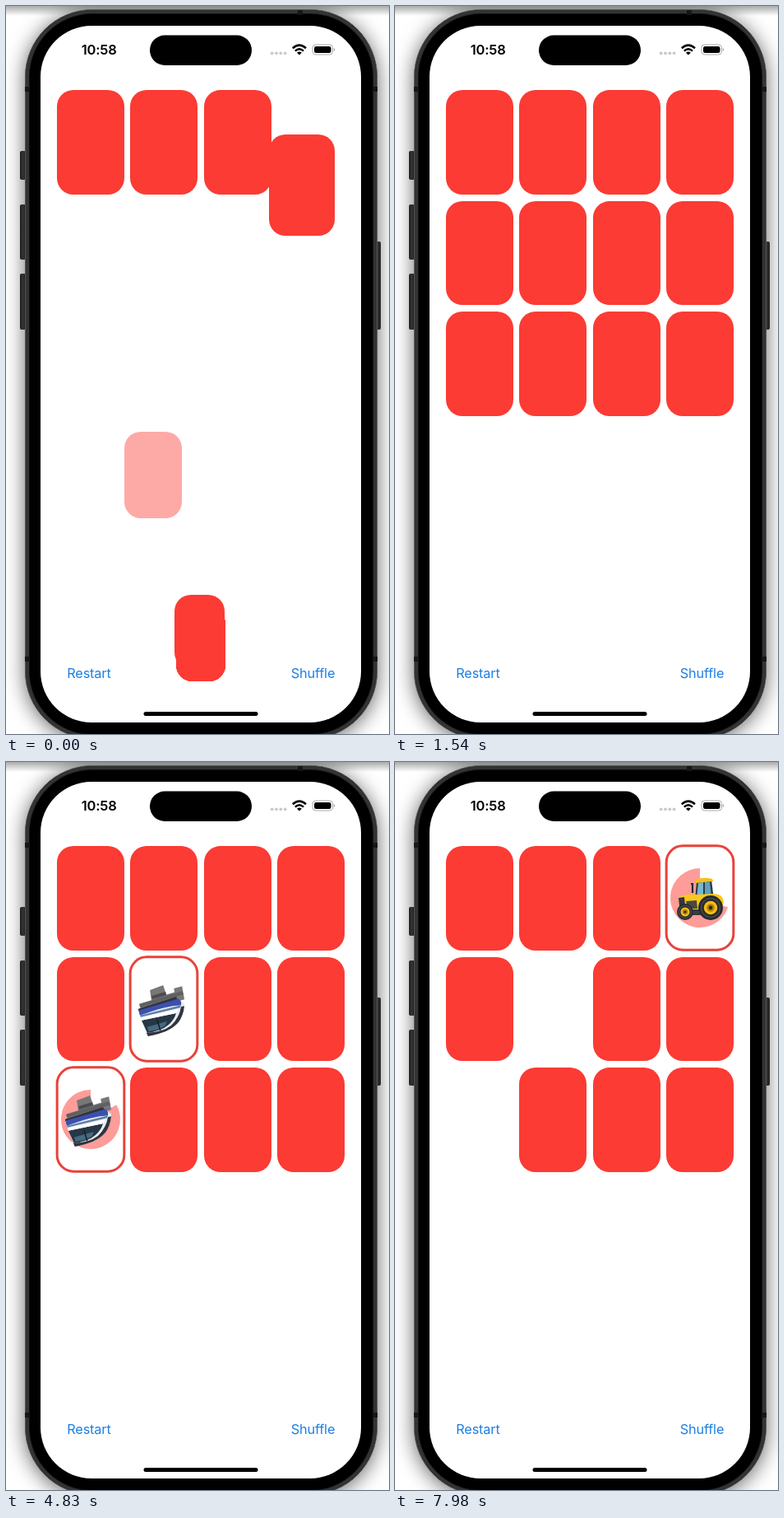
An HTML page for the animation above (8 s loop, 466 by 884 pixels).

```html
<!DOCTYPE html>
<html lang="en">
<head>
<meta charset="utf-8">
<title>Card game</title>
<style>
  html, body { margin: 0; width: 100%; height: 100%; overflow: hidden; background: #fff; }
  #stage { position: relative; width: 466px; height: 884px; overflow: hidden;
    background: linear-gradient(#0005, #0000 12px), #fff; }
  #stage > div, #stage > svg { position: absolute; }
  .body { left: 23px; top: 4px; width: 429px; height: 886px; border-radius: 82px; box-sizing: border-box;
    background: #000; border: 1px solid #555; box-shadow: 0 3px 24px #0009, inset 0 0 0 4px #333, inset 0 0 0 5px #111; }
  .screen { left: 42px; top: 24px; width: 390px; height: 846px; border-radius: 62px; background: #fff; }
  .key { background: linear-gradient(90deg, #222, #484848, #222); border-radius: 2px; }
  .notch { background: #161616; }
  #chrome { left: 0; top: 0; font-family: Inter, Roboto, sans-serif; }
  .card .back { position: absolute; inset: 0; border-radius: 20px; background: #fb3b34; }
  .card svg { position: absolute; left: 50%; top: 50%; width: 1px; height: 1px; overflow: visible; }
</style>
</head>
<body>
<div id="stage">
  <div class="key" style="left:17px;top:176px;width:7px;height:35px"></div>
  <div class="key" style="left:17px;top:241px;width:7px;height:67px"></div>
  <div class="key" style="left:17px;top:325px;width:7px;height:68px"></div>
  <div class="key" style="left:450px;top:286px;width:6px;height:107px"></div>
  <div class="body"></div>
  <div class="notch" style="left:23px;top:98px;width:6px;height:6px"></div>
  <div class="notch" style="left:446px;top:98px;width:6px;height:6px"></div>
  <div class="notch" style="left:23px;top:790px;width:6px;height:6px"></div>
  <div class="notch" style="left:446px;top:790px;width:6px;height:6px"></div>
  <div class="notch" style="left:355px;top:5px;width:6px;height:6px"></div>
  <div class="screen"></div>
  <svg id="chrome" width="466" height="884">
    <text x="113.2" y="59.2" font-size="16.5" font-weight="600" letter-spacing="-.2" text-anchor="middle">10:58</text>
    <rect x="175" y="35.5" width="124" height="36.5" rx="18.25"/>
    <g fill="#c9c9c9">
      <circle cx="323.7" cy="57.3" r="1.9"/><circle cx="329" cy="57.3" r="1.9"/>
      <circle cx="334.3" cy="57.3" r="1.9"/><circle cx="339.6" cy="57.3" r="1.9"/>
    </g>
    <g fill="none" stroke="#000" stroke-width="2.5">
      <path d="M348.8 51.3Q356.9 44 365 51.3M351.8 54.6Q356.9 50 362 54.6"/>
      <path d="M356.9 59.5L354 56.7Q356.9 54.4 359.8 56.7Z" fill="#000" stroke="none"/>
    </g>
    <rect x="373" y="47" width="24.5" height="12" rx="3.8" fill="none" stroke="#aaa"/>
    <rect x="375" y="49" width="20.5" height="8" rx="2.3"/>
    <path d="M398.8 51v4q1.5-.6 1.5-2t-1.5-2" fill="#aaa"/>
    <g font-size="16.3" letter-spacing="-.15" fill="#1e7fe2" text-anchor="middle">
      <text x="101" y="816.3">Restart</text><text x="373.5" y="816.3">Shuffle</text>
    </g>
    <rect x="167.5" y="857" width="139" height="5" rx="2.5"/>
  </svg>
</div>
<script>
const LOOP = 8000, STEP = 70;
const CARD = { w: 81.7, h: 126.3 };
const DECK = { x: 237, y: 775.3, w: 59.6, h: 89.4 };
const DEAL = { first: -941, gap: 175, length: 523 };
const SPRING = 10.88 / 1000;
const BONUS = 6300, SPIN = 2100;
const FIRST_TAP = 2910, MATCH = 3877, LAST_TAP = 6080;

// Drawn with the tilt the train has when it leans back by 17 degrees.
const train = `<g transform="rotate(17)">
  <path d="M-25 12L27-3L30 5L15 9.5L17 23L1 29L-3 17.5L-13 20.5L-12 25L-22 28Z" fill="#777"/>
  <path d="M-24 18L28 2L30 6L-22 22Z" fill="#606062"/>
  <path d="M-3 17L14 12L15 16L-2 21Z" fill="#4c4c4f"/>
  <path d="M19-33Q-7-29-18-16Q-25-5-25 7L-18 12L31-3Z" fill="#e9edf2"/>
  <path d="M19-33Q-7-29-18-16Q-24-7-25 4L-21 3Q-19-10-9-20Q1-28 21-29Z" fill="#30343d"/>
  <path d="M20-29Q3-27-6-19Q-13-13-15-5L27-14Z" fill="#263746"/>
  <path d="M-2-20Q6-26 18-27L20-22L-4-15Z" fill="#456a80"/>
  <path d="M-15-5L27-14L28-11L-18 0Z" fill="#fff"/>
  <path d="M-20 2L28-10L29-8L-21 5Z" fill="#5e7fa5"/>
  <path d="M-21 5Q-2 4 29-8L31-1L-16 13Q-22 12-21 5Z" fill="#3c50b0"/>
  <path d="M-16 12L31-2L31 0L-15 15Z" fill="#30333c"/>
  <path d="M4-26L8-13" stroke="#151e28" stroke-width="1.5"/></g>`;

const wheel = (x, y, r) => `<g transform="translate(${x} ${y})">
  <circle r="${r}" fill="#292a2d"/><circle r="${r * .76}" fill="none" stroke="#4a4b4f" stroke-width="1.4"/>
  <circle r="${r * .55}" fill="#f4bf13"/><circle r="${r * .32}" fill="#b78308"/><circle r="${r * .16}" fill="#332b19"/></g>`;
const tractor = `
  <path d="M-9-6V-17H-11" fill="none" stroke="#292a2d" stroke-width="2.2"/>
  <path d="M-4-20L14-22L17 2L-6 3Z" fill="#323940"/>
  <path d="M-2-18L4-19L4 0L-4 1Z" fill="#77b9d0"/>
  <path d="M6-19L12-19L14-1L6 0Z" fill="#5aa3bf"/>
  <path d="M-6-22Q4-26 15-23L16-20L-5-18Z" fill="#f3c01c"/>
  <path d="M-26-1Q-14-6-4-4L17-5Q28-5 29 5L27 12L-6 16L-25 11Z" fill="#f7c91b"/>
  <path d="M-26 0L-19-1L-18 9L-25 10Z" fill="#34363a"/>
  <path d="M-17 4L-4 3L-3 13L-15 13Z" fill="#484942"/>
  <path d="M-14 14H8V21H-10Z" fill="#3b3c3f"/>
  ${wheel(13, 12, 15)}${wheel(-18, 17, 10)}`;

function bezierInOut(x) {
  if (x <= 0) return 0;
  if (x >= 1) return 1;
  let lo = 0, hi = 1, s;
  for (let i = 0; i < 24; i++) {
    s = (lo + hi) / 2;
    if (1.26 * s * (1 - s) ** 2 + 1.74 * s * s * (1 - s) + s ** 3 < x) lo = s; else hi = s;
  }
  return s * s * (3 - 2 * s);
}

function spring(ms) {
  const k = Math.max(0, ms) * SPRING;
  return 1 - (1 + k) * Math.exp(-k);
}

function piePath(gap) {
  if (gap <= 0) return '';
  const a = gap * Math.PI / 180, r = 36;
  return `M0 0L${r * Math.sin(a)} ${-r * Math.cos(a)}A${r} ${r} 0 ${gap < 180 ? 1 : 0} 1 0 ${-r}Z`;
}

const plays = {
  3: { flip: LAST_TAP, art: tractor, pie: t => (t - LAST_TAP) / BONUS * 360 },
  5: { flip: MATCH, art: train, matched: true },
  8: { flip: FIRST_TAP, art: train, matched: true,
       pie: t => t < MATCH ? (t - FIRST_TAP) / BONUS * 360 : 60.5 }
};

const stage = document.getElementById('stage');
const cards = Array.from({ length: 12 }, (_, i) => {
  const el = document.createElement('div');
  el.className = 'card';
  el.style.zIndex = 12 - i;
  const play = plays[i];
  el.innerHTML = '<div class="back"></div>' + (play ? `<svg>
    <rect x="${-CARD.w / 2}" y="${-CARD.h / 2}" width="${CARD.w}" height="${CARD.h}" rx="20"
      fill="#fff" stroke="#e8423a" stroke-width="3"/>
    <path class="pie" fill="#fb3b34" opacity=".5"/><g class="art">${play.art}</g></svg>` : '');
  stage.append(el);
  const find = s => el.querySelector(s);
  return { el, i, play, x: 102.8 + i % 4 * 89.5, y: 165.6 + Math.floor(i / 4) * 134.4,
    back: find('.back'), face: find('svg'), pie: find('.pie'), art: find('.art') };
});

function deal(card, t) {
  const p = bezierInOut((t - DEAL.first - card.i * DEAL.gap) / DEAL.length);
  const mix = (a, b) => a + (b - a) * p;
  const w = mix(DECK.w, CARD.w), h = mix(DECK.h, CARD.h), s = card.el.style;
  s.left = mix(DECK.x, card.x) - w / 2 + 'px';
  s.top = mix(DECK.y, card.y) - h / 2 + 'px';
  s.width = w + 'px';
  s.height = h + 'px';
  if (card.i === 4) s.opacity = p;
}

function turn(card, t) {
  const { flip, matched, pie } = card.play;
  const angle = 180 * spring(t - flip), up = angle >= 90;
  const scale = matched ? 1 - spring(t - LAST_TAP) : 1;
  card.back.style.display = up ? 'none' : '';
  card.face.style.display = up ? '' : 'none';
  card.el.style.visibility = scale < .004 ? 'hidden' : 'visible';
  card.el.style.transform = angle > 0
    ? `scale(${scale}) perspective(${CARD.h}px) rotateY(${up ? 180 - angle : -angle}deg)` : 'none';
  if (pie) card.pie.setAttribute('d', piePath(pie(t)));
  if (matched) card.art.setAttribute('transform', `rotate(${Math.max(0, t - MATCH) / SPIN * 360})`);
}

function draw(t) {
  for (const card of cards) {
    deal(card, t);
    if (card.play) turn(card, t);
  }
}

const start = performance.now();
function tick() {
  const t = (performance.now() - start) % LOOP;
  draw(Math.floor((t + 8) / STEP) * STEP);
  requestAnimationFrame(tick);
}
draw(0);
requestAnimationFrame(tick);
</script>
</body>
</html>
```
